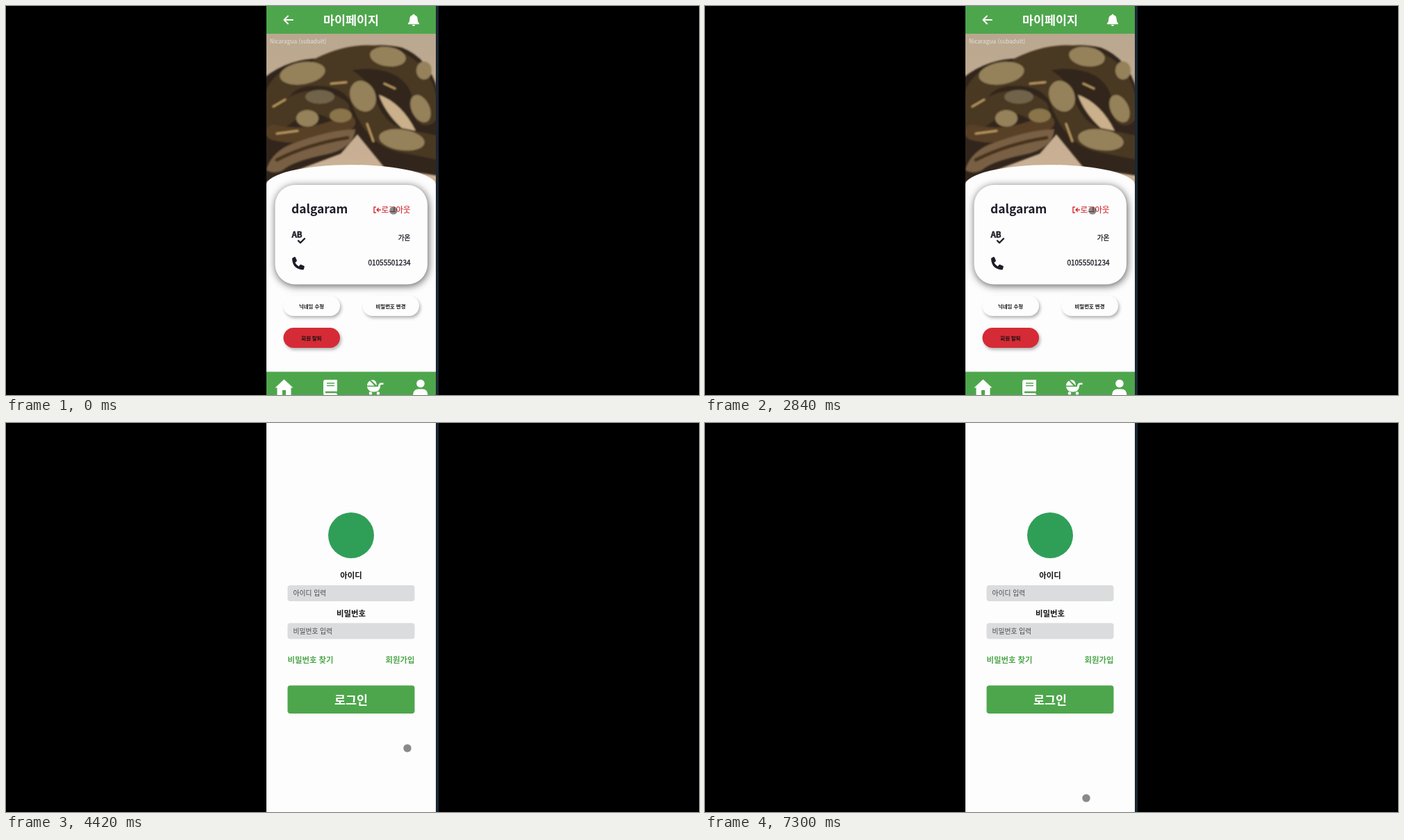
An HTML page for the animation above (7340 ms loop, 998 px wide and 561 px high).

```html
<!DOCTYPE html>
<html lang="ko">
<head>
<meta charset="utf-8">
<style>
html, body { margin: 0; width: 100%; height: 100%; overflow: hidden; background: #000; }
svg { display: block; width: 998px; height: 561px; font-family: "Noto Sans CJK KR", "Noto Sans KR", "Noto Sans CJK JP", sans-serif; }
.b { font-weight: 700; }
.m { font-weight: 500; stroke: #1d1d28; stroke-width: .3px; }
.mid { text-anchor: middle; }
.end { text-anchor: end; }
.card { filter: drop-shadow(1px 2px 6px rgba(0,0,0,.65)); }
.btn { filter: drop-shadow(2px 3px 2px rgba(0,0,0,.28)); }
.line { fill: none; stroke-linecap: round; stroke-linejoin: round; }
</style>
</head>
<body>
<svg viewBox="0 0 998 561">
  <defs>
    <clipPath id="screen"><rect x="375" width="244" height="561"/></clipPath>
    <clipPath id="photo"><rect x="375" y="40" width="244" height="219"/></clipPath>
    <linearGradient id="sand" x2="0" y2="1">
      <stop stop-color="#b9a78f"/><stop offset="1" stop-color="#cdb296"/>
    </linearGradient>
    <filter id="soft" x="-5%" y="-5%" width="110%" height="110%"><feGaussianBlur stdDeviation="1"/></filter>
  </defs>
  <rect width="998" height="561"/>
  <rect x="619" width="4" height="561" fill="#1c2733"/>
  <rect x="375" width="244" height="561" fill="#fdfdfd"/>

  <g id="profile" clip-path="url(#screen)">
    <g clip-path="url(#photo)">
      <rect x="375" y="40" width="244" height="219" fill="url(#sand)"/>
      <g filter="url(#soft)">
        <path d="M370 105Q410 72 465 76Q520 48 570 60Q612 76 624 130V245L545 233L506 185L482 213L410 240L370 256Z" fill="#33281c"/>
        <g class="line" stroke="#493722" stroke-width="34">
          <path d="M455 90Q505 66 548 77Q605 92 605 155"/>
          <path d="M383 165Q383 108 430 99Q490 92 512 130Q530 186 570 194L630 206"/>
          <path d="M394 160Q440 124 478 150"/>
        </g>
        <path class="line" d="M385 182Q435 195 492 168" stroke="#584127" stroke-width="22"/>
        <path d="M375 236Q384 207 420 196Q470 178 503 178Q500 206 460 214Q412 224 398 237Q384 243 375 236Z" fill="#796044"/>
        <path class="line" d="M390 222Q435 199 492 190" stroke="#46321f" stroke-width="5"/>
        <path d="M537 128Q570 140 590 180L570 176Q546 154 537 128Z" fill="#cbb08c"/>
        <g fill="#95815a">
          <ellipse cx="427" cy="97" rx="33" ry="16" transform="rotate(-9 427 97)"/>
          <ellipse cx="550" cy="73" rx="26" ry="14" transform="rotate(8 550 73)"/>
          <ellipse cx="514" cy="130" rx="18" ry="23" transform="rotate(-24 514 130)"/>
          <ellipse cx="434" cy="162" rx="16" ry="12"/>
          <ellipse cx="570" cy="193" rx="33" ry="15" transform="rotate(8 570 193)"/>
          <ellipse cx="597" cy="148" rx="13" ry="21" transform="rotate(-25 597 148)"/>
          <ellipse cx="452" cy="131" rx="21" ry="10" fill="#70634a"/>
          <ellipse cx="482" cy="158" rx="16" ry="10" fill="#8a754c"/>
          <ellipse cx="602" cy="93" rx="11" ry="13"/>
        </g>
        <path class="line" d="M385 145L402 135M390 184L420 180M468 112L490 110M545 112L560 119M520 170L529 195" stroke="#b8965f" stroke-width="3"/>
      </g>
      <text x="380" y="54" font-size="8.3" fill="#eee" opacity=".8">Nicaragua (subadult)</text>
    </g>
    <ellipse cx="497" cy="258" rx="122" ry="29" fill="#fdfdfd"/>
    <rect x="375" y="258" width="244" height="270" fill="#fdfdfd"/>
    <rect width="998" height="40" fill="#4ea64c"/>
    <path class="line" d="M413 20H401M406 14.5L400.5 20L406 25.5" stroke="#fff" stroke-width="2"/>
    <text class="b mid" x="497" y="27" font-size="17.4" fill="#fff">마이페이지</text>
    <path d="M587 11.5q1.3 0 1.3 1.5q4.4 1 4.4 6q0 4 2.3 6v1.2h-16V25q2.3-2 2.3-6q0-5 4.4-6q0-1.5 1.3-1.5ZM584.8 27h4.4q-.5 2-2.2 2t-2.2-2Z" fill="#fff"/>

    <rect class="card" x="387.5" y="258" width="219.5" height="143.5" rx="29" fill="#fdfdfd"/>
    <g fill="#1d1d28">
      <text class="b" x="411" y="299" font-size="17.4">dalgaram</text>
      <text class="b" x="411.5" y="334" font-size="11.5" stroke="#1d1d28" stroke-width=".4">AB</text>
      <path class="line" d="M421 338.5L424 341.5L430 335.5" stroke="#1d1d28" stroke-width="2.4"/>
      <path d="M416.8 362.2l2 4.6q.3 1-.5 1.7l-2 1.6q1.8 3.5 5.3 5.3l1.7-2q.7-.8 1.7-.4l4 1.7q1 .5.8 1.4l-.9 3.3q-.3 1-1.3 1q-14.8-.6-15.6-15.8q0-1 1-1.3l2.5-1.6q1-.2 1.3.5Z"/>
      <text class="m end" x="582.5" y="338" font-size="9.7">가온</text>
      <text class="m end" x="582.5" y="374.2" font-size="10">01055501234</text>
    </g>
    <path class="line" d="M532.5 290H530V298H532.5M539.5 294H534M536.5 291.5L534 294L536.5 296.5" stroke="#d42a34" stroke-width="1.4"/>
    <text class="end" x="582.5" y="298.3" font-size="11.4" fill="#d42a34" stroke="#d42a34" stroke-width=".2">로그아웃</text>

    <g class="btn">
      <rect x="399.5" y="418" width="81.5" height="29" rx="14.5" fill="#fdfdfd"/>
      <rect x="513.5" y="418" width="81.5" height="29" rx="14.5" fill="#fdfdfd"/>
      <rect x="399.5" y="464" width="81.5" height="29" rx="14.5" fill="#d52b36"/>
    </g>
    <g class="b mid" font-size="7.4" fill="#111">
      <text x="440" y="436">닉네임 수정</text>
      <text x="554" y="436">비밀번호 변경</text>
      <text x="440" y="481.5">회원 탈퇴</text>
    </g>

    <rect y="527.5" width="998" height="34" fill="#4ea64c"/>
    <g fill="#fff">
      <path d="M400.5 538.5L413.5 550.5H410.5V562H403V554H398V562H390.5V550.5H387.5Z"/>
      <path d="M460 539H477V555.5H475.5V559H477V562H460Q457 562 457 558V542Q457 539 460 539Z"/>
      <path d="M520 547.5Q520 543 524 540.5L530.5 547.5ZM525.5 539.5Q533.5 537.5 534 547.5Z"/>
      <path d="M520 549H536Q536 543.5 540.5 543.5H543.5V546H540.5Q539 546 539 549Q538 556.5 530 556.5Q521 556.5 520 549Z"/>
      <circle cx="525" cy="558.5" r="2.3"/><circle cx="536" cy="558.5" r="2.3"/>
      <circle cx="597" cy="544.5" r="5.8"/>
      <path d="M586 562Q586 552.5 594 552.5H600Q607.5 552.5 607.5 562Z"/>
    </g>
    <path d="M462 544H473M462 547.5H473" stroke="#4ea64c" stroke-width="1.4"/>
    <path d="M460 557H475.5" stroke="#4ea64c" stroke-width="2.6"/>
  </g>

  <g id="login">
    <circle cx="497" cy="162" r="33" fill="#2f9f58"/>
    <g fill="#dbdcde">
      <rect x="405.5" y="234" width="183" height="23" rx="4"/>
      <rect x="405.5" y="288.5" width="183" height="23" rx="4"/>
    </g>
    <g class="b mid" font-size="11.4" fill="#151515">
      <text x="497" y="224.2">아이디</text>
      <text x="497" y="279.2">비밀번호</text>
    </g>
    <g font-size="9.75" fill="#44474b">
      <text x="413.5" y="249">아이디 입력</text>
      <text x="413.5" y="304">비밀번호 입력</text>
    </g>
    <g class="b" font-size="11.4" fill="#4ea64c">
      <text x="405.5" y="346">비밀번호 찾기</text>
      <text class="end" x="588.5" y="346">회원가입</text>
    </g>
    <rect x="405.5" y="378.5" width="183" height="40.5" rx="4" fill="#4ea64c"/>
    <text class="b mid" x="497" y="406" font-size="17.4" fill="#fff">로그인</text>
  </g>
  <circle id="pointer" r="6" fill="rgba(0,0,0,.46)" stroke="rgba(255,255,255,.55)"/>
</svg>
<script>
const LOOP = 7340, LOGOUT = 3040;
// time, x, y
const path = [
  [0, 558, 295], [3700, 558, 295], [4420, 578, 469], [4700, 578, 469],
  [5420, 568, 409], [5600, 568, 409], [6010, 545, 448], [6210, 514, 542],
  [6780, 493, 541], [7300, 549, 541], [LOOP, 549, 541]
];
const get = id => document.getElementById(id);
const show = (id, on) => get(id).style.display = on ? "" : "none";

function draw(t) {
  const i = path.findIndex(p => p[0] > t);
  const [t0, x0, y0] = path[i - 1], [t1, x1, y1] = path[i];
  const k = (t - t0) / (t1 - t0), e = k * k * (3 - 2 * k);
  get("pointer").setAttribute("transform", `translate(${x0 + (x1 - x0) * e} ${y0 + (y1 - y0) * e})`);
  show("profile", t < LOGOUT);
  show("login", t >= LOGOUT);
}

const start = performance.now();
function tick() {
  draw((performance.now() - start) % LOOP);
  requestAnimationFrame(tick);
}
tick();
</script>
</body>
</html>
```
